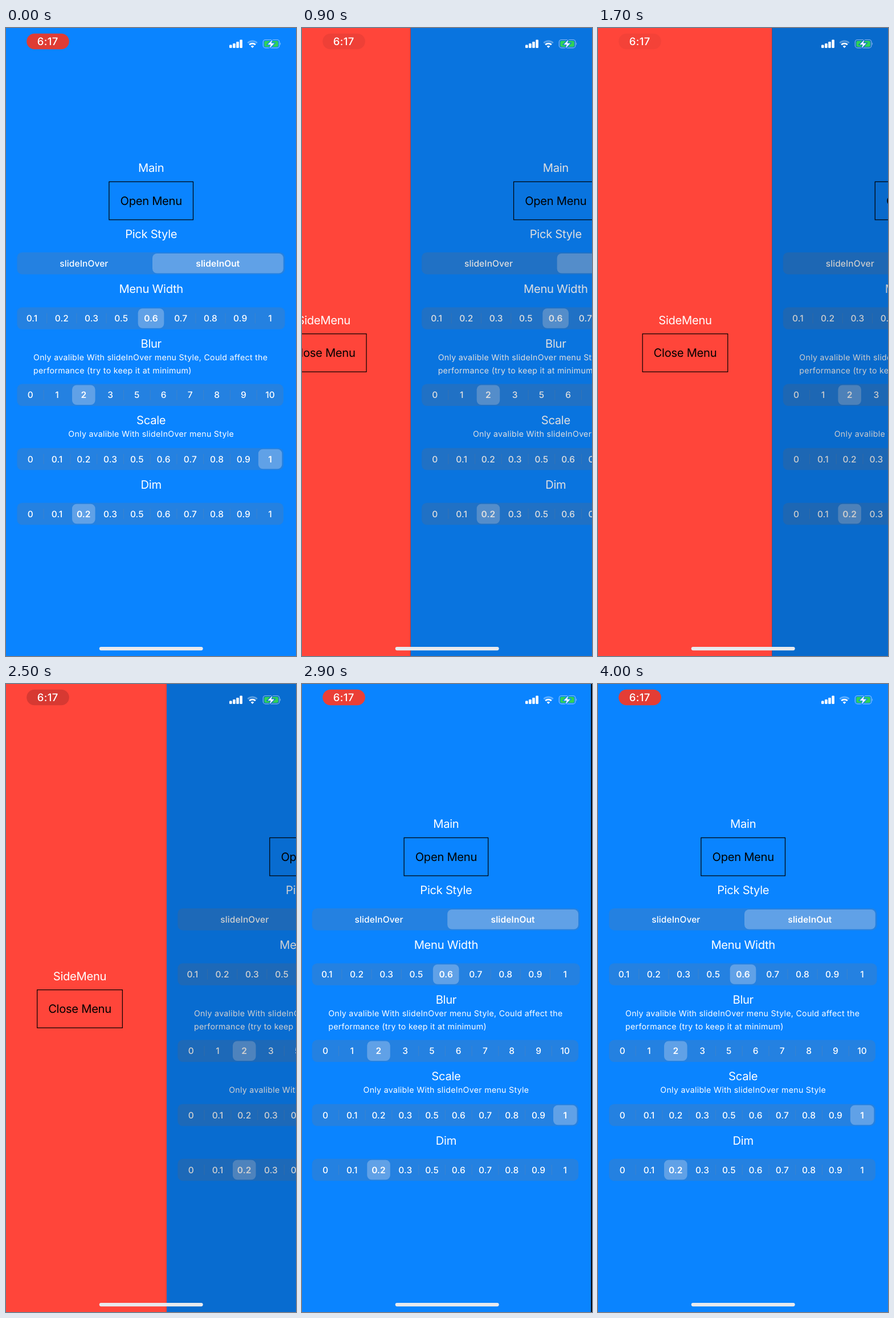
These frames come from a looping animation (509x1100 px, 4.1 s). An HTML page:

```html
<!DOCTYPE html>
<html lang="en">
<head>
<meta charset="utf-8">
<title>Side menu</title>
<style>
  html, body { margin: 0; width: 100%; height: 100%; overflow: hidden; background: #000; }
  svg { display: block; width: 100%; height: 100%; }
  text {
    font-family: Inter, Roboto, sans-serif;
    font-optical-sizing: none;
    fill: #fff;
    text-anchor: middle;
    text-rendering: geometricPrecision;
  }
  .body { font-size: 20.2px; letter-spacing: -.3px; }
  .note { font-size: 14.2px; letter-spacing: .29px; }
  .left { text-anchor: start; }
  .seg { font-size: 15.5px; font-weight: 500; letter-spacing: .1px; }
  .on { font-weight: 600; }
  .clock { font-size: 18.4px; font-weight: 500; letter-spacing: .4px; }
  .dark { fill: #000; }
  .frame { fill: none; stroke: #000; stroke-width: 1.2; }
  .track { fill: rgba(118, 118, 128, .24); }
  .thumb { fill: rgba(235, 235, 245, .3); }
  .line { fill: rgba(142, 142, 147, .2); }
</style>
</head>
<body>
<svg viewBox="0 0 509 1100">
  <defs>
    <path id="bolt" d="M467.6 20.4 L459.4 28.9 H464.8 L462.6 35.6 L471 26.8 H465.5 Z"/>
    <mask id="cut" maskUnits="userSpaceOnUse" x="445" y="15" width="45" height="26">
      <rect x="445" y="15" width="45" height="26" fill="#fff"/>
      <use href="#bolt" stroke="#000" stroke-width="2.4"/>
    </mask>
  </defs>

  <g id="main"><rect width="509" height="1100" fill="#0a84ff"/></g>
  <g id="menu"><rect x="-.6" width="305.4" height="1100" fill="#ff453a"/></g>

  <g id="status" fill="#fff">
    <rect id="pill" x="36.2" y="9.7" width="74.6" height="27.6" rx="13.8"/>
    <rect x="392" y="29.6" width="4.6" height="5.4" rx="1.2"/>
    <rect x="398.1" y="27" width="4.6" height="8" rx="1.2"/>
    <rect x="404.2" y="23.9" width="4.6" height="11.1" rx="1.2"/>
    <rect x="410.3" y="20.6" width="4.6" height="14.4" rx="1.2"/>
    <g fill="none" stroke="#fff" stroke-width="2.8">
      <path d="M424.3 26.2 A12 12 0 0 1 440.7 26.2" opacity=".35"/>
      <path d="M427.2 29.3 A7.8 7.8 0 0 1 437.8 29.3"/>
    </g>
    <path d="M432.5 35 L429.7 32 A4.1 4.1 0 0 1 435.3 32 Z"/>
    <g mask="url(#cut)">
      <rect x="451.3" y="20.5" width="28.6" height="14.4" rx="4.2" fill="none" stroke="#fff" stroke-opacity=".5" stroke-width="1.2"/>
      <rect x="453.3" y="22.5" width="24.6" height="10.4" rx="2.6" fill="#30d158"/>
      <path d="M481.2 25.3 Q483.2 27.7 481.2 30.1 Z" opacity=".5"/>
    </g>
    <use href="#bolt"/>
    <rect x="163.7" y="1084" width="182" height="6.2" rx="3.1" fill="#e8eaee"/>
  </g>
</svg>
<script>
const LOOP = 4100, STEP = 100, WIDTH = 304.8, MID = 254.7;
const byId = id => document.getElementById(id);
const main = byId('main'), menu = byId('menu'), pill = byId('pill');

function add(parent, tag, attrs, content) {
  const el = document.createElementNS('http://www.w3.org/2000/svg', tag);
  for (const k in attrs) el.setAttribute(k, attrs[k]);
  if (content) el.textContent = content;
  parent.append(el);
  return el;
}

const box = (parent, cls, x, y, width, height, rx = 0) =>
  add(parent, 'rect', { class: cls, x, y, width, height, rx });

// y is the middle of the capitals
function label(parent, cls, x, y, content) {
  const el = add(parent, 'text', { class: cls, x }, content);
  el.setAttribute('y', y + parseFloat(getComputedStyle(el).fontSize) * .3635);
}

function button(parent, x, y, width, content) {
  box(parent, 'frame', x - width / 2, y - 33.3, width, 66.6);
  label(parent, 'body dark', x, y, content);
}

function segments(y, items, picked, width, inset) {
  const left = 19.4, w = width / items.length;
  box(main, 'track', left, y - 19.3, width, 38.6, 9);
  items.forEach((item, i) => {
    const x = left + i * w, on = i === picked;
    if (on) box(main, 'thumb', x + inset, y - 17.3, w - 2 * inset, 34.6, 8);
    else if (i && i - 1 !== picked) box(main, 'line', x - .6, y - 9, 1.2, 18);
    label(main, on ? 'seg on' : 'seg', x + w / 2, y, item);
  });
}

const tenths = ['0.1', '0.2', '0.3', '0.5', '0.6', '0.7', '0.8', '0.9', '1'];

label(main, 'body', MID, 245, 'Main');
button(main, MID, 302.6, 147.6, 'Open Menu');
label(main, 'body', MID, 360.4, 'Pick Style');
segments(412.2, ['slideInOver', 'slideInOut'], 1, 470, 2.6);
label(main, 'body', MID, 456.6, 'Menu Width');
segments(508.5, tenths, 4, 470.2, 3.3);
label(main, 'body', MID, 552.8, 'Blur');
label(main, 'note left', 48, 577.2, 'Only avalible With slideInOver menu Style, Could affect the');
label(main, 'note left', 48, 599.4, 'performance (try to keep it at minimum)');
segments(642.8, ['0', '1', '2', '3', '5', '6', '7', '8', '9', '10'], 2, 467.6, 3.1);
label(main, 'body', MID, 686.6, 'Scale');
label(main, 'note', MID, 711, 'Only avalible With slideInOver menu Style');
segments(755, ['0', ...tenths], 9, 467.6, 2.6);
label(main, 'body', MID, 799.2, 'Dim');
segments(851, ['0', ...tenths], 2, 467.6, 3.1);
const dim = add(main, 'rect', { width: 509, height: 1100 });

label(menu, 'body', WIDTH / 2, 511.3, 'SideMenu');
button(menu, WIDTH / 2, 569, 149.6, 'Close Menu');

label(byId('status'), 'clock', 73.3, 23.6, '6:17');

// Damped spring from 0 to 1; times in ms
function spring(t, response) {
  if (t <= 0) return 0;
  const zeta = .825, root = Math.sqrt(1 - zeta * zeta);
  const w = 2 * Math.PI * t / response;
  return 1 - Math.exp(-zeta * w) * (Math.cos(root * w) + zeta / root * Math.sin(root * w));
}

const mix = (a, b, k) => Math.round(a + (b - a) * k);

function draw(t) {
  const open = spring(t - 661, 800) - spring(t - 2460, 575);
  const x = WIDTH * open;
  main.setAttribute('transform', `translate(${x.toFixed(2)} 0)`);
  menu.setAttribute('transform', `translate(${(x - WIDTH).toFixed(2)} 0)`);
  dim.setAttribute('fill-opacity', Math.min(1, Math.max(0, open)) * .2);

  const glow = (1 + Math.cos(2 * Math.PI * (t - 1350) / (LOOP / 2))) / 2;
  pill.setAttribute('fill', `rgb(${mix(213, 255, glow)},${mix(57, 69, glow)},${mix(50, 58, glow)})`);
}

const start = performance.now();
function tick() {
  const t = (performance.now() - start + 15) % LOOP;
  draw(Math.floor(t / STEP) * STEP);
  requestAnimationFrame(tick);
}
tick();
</script>
</body>
</html>
```
